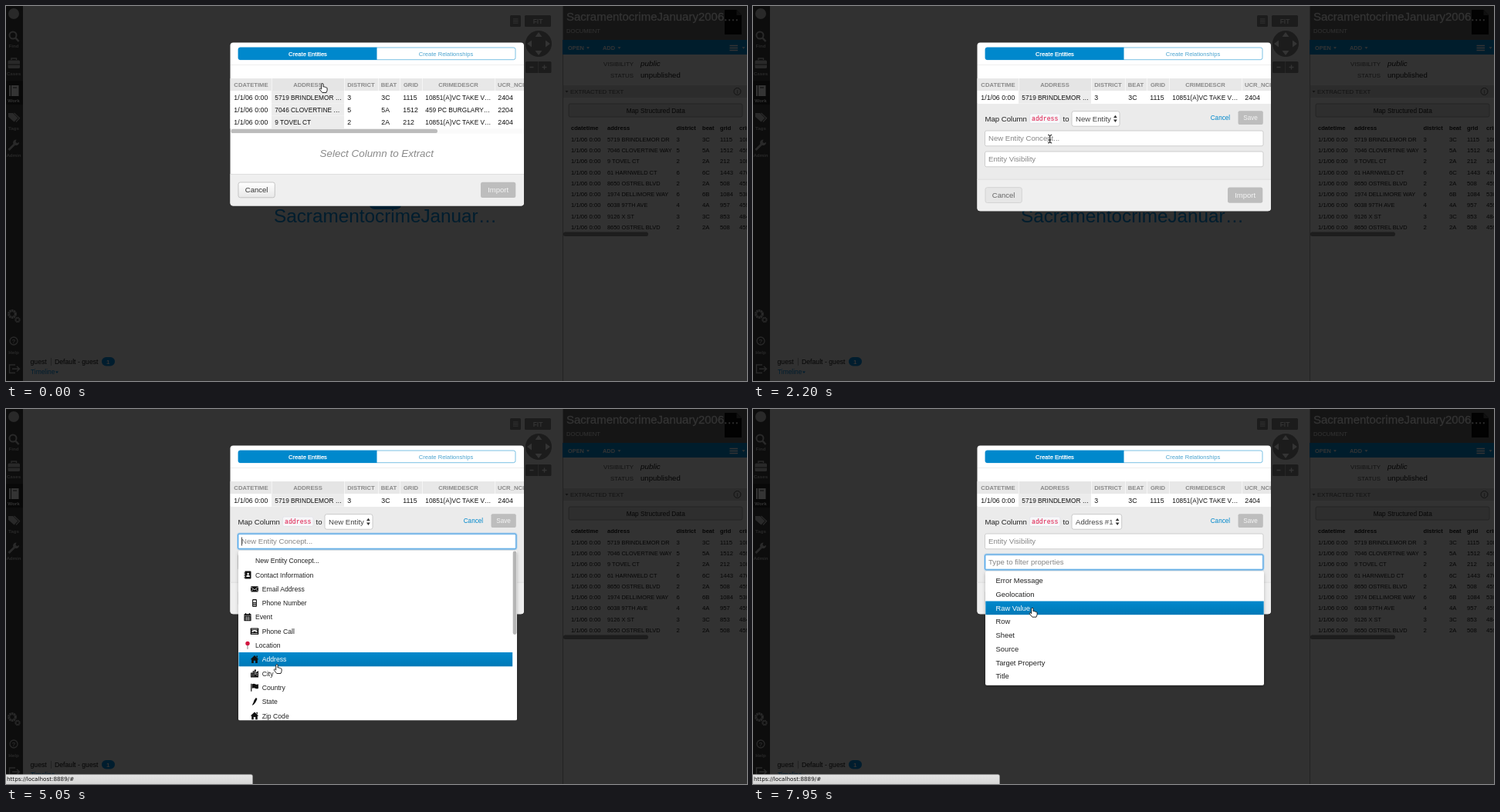
An HTML page for the animation above (8 s loop, 960 by 487 pixels).

```html
<!DOCTYPE html>
<html lang="en">
<head>
<meta charset="utf-8">
<title>Map Structured Data</title>
<style>
html, body { margin: 0; width: 100%; height: 100%; overflow: hidden; background: #313131; }
svg { display: block; width: 100%; height: 100%; font-family: "Liberation Sans", Arial, sans-serif; }
text { white-space: pre; }
</style>
</head>
<body>
<svg id="stage" viewBox="0 0 960 487" xmlns="http://www.w3.org/2000/svg"></svg>
<script>
const LOOP = 8000;
const BLUE = '#0088cc', NAVY = '#001d2e', PALE = '#343434';
const $ = id => document.getElementById(id);

// Markup helpers
const text = (x, y, size, fill, str, extra = '') =>
  `<text x="${x}" y="${y}" font-size="${size}" fill="${fill}" ${extra}>${str}</text>`;
const rect = (x, y, w, h, fill, extra = '') =>
  `<rect x="${x}" y="${y}" width="${w}" height="${h}" fill="${fill}" ${extra}/>`;
const path = (d, fill, extra = '') => `<path d="${d}" fill="${fill}" ${extra}/>`;
const group = (id, body, extra = '') => `<g id="${id}" ${extra}>${body}</g>`;
const at = (x, y, body) => `<g transform="translate(${x} ${y})">${body}</g>`;
const line = (d, stroke, w = 1) => path(d, 'none', `stroke="${stroke}" stroke-width="${w}"`);
const caret = (x, y, fill) => path(`M${x - 2} ${y}h4l-2 2.5z`, fill);
const MID = 'text-anchor="middle"', END = 'text-anchor="end"';
const BOLD = 'font-weight="bold"', ITALIC = 'font-style="italic"';

const ROWS = [
  ['5719 BRINDLEMOR DR', 3, '3C', 1115, '108'],
  ['7046 CLOVERTINE WAY', 5, '5A', 1512, '459'],
  ['9 TOVEL CT', 2, '2A', 212, '108'],
  ['61 HARNWELD CT', 6, '6C', 1443, '476'],
  ['8650 OSTREL BLVD', 2, '2A', 508, '459'],
  ['1974 DELLIMORE WAY', 6, '6B', 1084, '530'],
  ['6038 97TH AVE', 4, '4A', 957, '459'],
  ['9126 X ST', 3, '3C', 853, '484'],
  ['8650 OSTREL BLVD', 2, '2A', 508, '459']
];

const ICONS = {
  book: path('M-3.5-5h7a1 1 0 0 1 1 1v8a1 1 0 0 1-1 1h-7zM-4.6-3h1v1.2h-1zM-4.6 0h1v1.2h-1zM-4.6 3h1v1.2h-1z', '#111') +
    '<circle cx=".6" cy="-1.4" r="1.3" fill="#fff"/>' + path('M-1.8 2.6q0-2.4 2.4-2.4t2.4 2.4z', '#fff'),
  mail: rect(-5, -3.5, 10, 7.4, '#111', 'rx=".8"') + line('M-5-2.8L0 1.2 5-2.8M-5 3.6L-1.6.3M5 3.6L1.6.3', '#fff', .7),
  phone: rect(-2.9, -5, 5.8, 10, '#111', 'rx="1"') + rect(-1.8, -3.6, 3.6, 2.8, '#fff') +
    line('M-1.8.7h3.6M-1.8 2.2h3.6M-1.8 3.7h3.6', '#fff', .7),
  calendar: rect(-4.6, -4, 9.2, 9, '#111', 'rx=".6"') + rect(-3.2, -5.2, 1.4, 2, '#111') + rect(1.8, -5.2, 1.4, 2, '#111') +
    line('M-4.6-1.6h9.2M-3.6 1h7.2M-3.6 3h7.2M-1.2-.8v5M1.2-.8v5', '#fff', .5),
  call: rect(-5.3, -4.2, 10.6, 8.6, '#111', 'rx=".8"') + line('M-4-2.6h8M-4 3h8', '#fff', .7) +
    path('M-3.6.8q0-2.3 3.6-2.3t3.6 2.3l-2 .4-.4-1h-2.4l-.4 1z', '#fff'),
  pin: '<circle cx="0" cy="-2.4" r="2.7" fill="#d3163f"/>' + line('M0 0v5', '#777', .9),
  house: path('M0-5L5.3.2H3.8V4.8H1.2V1.6h-2.4v3.2h-2.6V.2h-1.5zM2.4-4.6h1.5v2.6l-1.5-1.4z', '#111'),
  city: path('M-5 5V-1h2.6v-2.2H-.2V-5H2v3.4L5-3.4V5z', '#111') +
    line('M-4 .8h1M-4 2.8h1M-1.6-1.6h1M-1.6.8h1M-1.6 2.8h1M2.6 0h1.4M2.6 2h1.4M1-3.4v5', '#fff', .8),
  flag: path('M-4.8-5h1.2v10h-1.2zM-3.2-4.5q2.4-1 4.2 0t4 0v5.4q-2.2 1-4 0t-4.2 0z', '#111'),
  state: path('M1.8-5l1.6 1-.7 2.2Q1.4 1.6-1 3.6L-3 5q.2-2 1.4-3.6L-.4-2z', '#111')
};

const CONCEPTS = [
  ['New Entity Concept...', 0], ['Contact Information', 0, 'book'], ['Email Address', 1, 'mail'],
  ['Phone Number', 1, 'phone'], ['Event', 0, 'calendar'], ['Phone Call', 1, 'call'],
  ['Location', 0, 'pin'], ['Address', 1, 'house'], ['City', 1, 'city'],
  ['Country', 1, 'flag'], ['State', 1, 'state'], ['Zip Code', 1, 'house']
];
const PROPS = ['Error Message', 'Geolocation', 'Raw Value', 'Row', 'Sheet', 'Source', 'Target Property', 'Title'];

// Menus: top of the first row and row height
const MENU = {
  concept: { top: 187.9, step: 18.3, count: CONCEPTS.length },
  prop: { top: 214.2, step: 17.67, count: PROPS.length }
};

function sidebar() {
  const ink = '#292929', base = '#0d0d0d';
  const label = (y, s, c = ink) => text(10, y, 6.2, c, s, `${MID} ${BOLD}`);
  return rect(0, 0, 22, 487, base) + rect(0, 97, 22, 31, '#080808') +
    `<circle cx="10" cy="10" r="7" fill="${ink}"/>` +
    `<circle cx="9" cy="38" r="4.5" fill="none" stroke="${ink}" stroke-width="2"/>` + line('M12 41l4.5 5', ink, 2.6) + label(54, 'Find') +
    rect(2.5, 70.5, 15.5, 10.5, ink, 'rx="1.5"') + line('M7 70v-2h6.5v2', ink, 1.5) + line('M2.5 76h15.5', base) + label(89.5, 'Cases') +
    path('M4 103h12.5v14H4z', PALE) + line('M6.5 103v14M9 106h5', base) + label(125, 'Work', PALE) +
    path('M3 139h6l6.5 6.5-5 5L3 144z', ink) + line('M10.5 139l7 6.5-4.5 5', ink, 1.3) + label(160.5, 'Tags') +
    line('M3.5 187l8-8', ink, 3) + path('M17 177l-3 1-1.5-1.5 1-3q-4 0-4.5 4 1 4 5 3.5 3-1 3-4z', ink) + label(195.5, 'Admin') +
    `<circle cx="8" cy="400" r="4.3" fill="none" stroke="${ink}" stroke-width="3.2" stroke-dasharray="2.2 .5"/>` +
    `<circle cx="15" cy="407.5" r="2.6" fill="none" stroke="${ink}" stroke-width="2.2" stroke-dasharray="1.6 .4"/>` +
    `<circle cx="10" cy="435" r="5" fill="none" stroke="${ink}" stroke-width="1.3"/>` +
    text(10, 438, 8, ink, '?', `${MID} ${BOLD}`) + label(451.5, 'Help') +
    line('M12 466H4.5v10.5H12M8 471.2h9M14 468l3.5 3.2-3.5 3.3', ink, 1.5);
}

function graph() {
  const dark = '#1c1c1c';
  return rect(470, 240, 43, 24, NAVY, 'rx="8"') +
    text(491.5, 281, 24.3, NAVY, 'SacramentocrimeJanuar…', MID) +
    rect(653, 12, 14, 15, dark, 'rx="1.5"') + line('M657 17h6.5M657 19.5h6.5M657 22h6.5', PALE) +
    rect(672, 12, 34, 15, dark, 'rx="1.5"') + text(689, 23, 8.5, PALE, 'FIT', `${MID} ${BOLD}`) +
    `<circle cx="690" cy="49" r="17" fill="${dark}"/>` +
    path('M690 34l4.5 6h-9zM690 64l4.5-6h-9zM675 49l6-4.5v9zM705 49l-6-4.5v9z', PALE) +
    rect(673, 72, 33.5, 15, dark, 'rx="1.5"') + line('M689.7 72v15', '#292929') +
    line('M678.5 79.5h5M694.5 79.5h6M697.5 76.5v6', PALE, 1.4) +
    text(31.5, 464.6, 8.7, '#050505', 'guest') + line('M58.5 457v10', '#222') +
    text(63, 464.6, 8.7, '#050505', 'Default - guest') +
    rect(124, 456, 17, 11.5, NAVY, 'rx="5.7"') + text(132.3, 464.6, 8, PALE, '1', `${MID} ${BOLD}`) +
    text(32, 478, 8.4, NAVY, 'Timeline') + caret(66, 474.5, NAVY);
}

function detail() {
  const ink = '#060606', soft = '#131313';
  let s = rect(721, 0, 239, 487, '#323232') + rect(721, 0, 239, 44, '#151515') + line('M721.5 0v487', '#232323') +
    path('M931 5h15.5l6.5 7v25h-22z', '#020202') + path('M946.5 5v7h6.5z', '#101010') +
    text(726, 18.7, 15, PALE, 'SacramentocrimeJanuary2006.…', `stroke="${PALE}" stroke-width=".3"`) +
    text(726, 35.4, 7.6, PALE, 'DOCUMENT') +
    rect(721, 44, 239, 19, '#001d2c') +
    text(728, 57, 7.4, PALE, 'OPEN', BOLD) + caret(754, 53.3, PALE) +
    text(773, 57, 7.4, PALE, 'ADD', BOLD) + caret(794.5, 53.3, PALE) +
    line('M937.5 51.5h10.5M937.5 54.5h10.5M937.5 57.5h10.5', PALE, 1.3) + caret(955.5, 53.3, PALE) +
    text(813, 77.7, 7.9, soft, 'VISIBILITY', END) + text(822, 78, 9.9, ink, 'public', ITALIC) +
    text(813, 92.6, 7.9, soft, 'STATUS', END) + text(822, 93, 9.6, ink, 'unpublished') +
    rect(722, 103, 238, 16, '#2c2c2c') + caret(726.5, 110, soft) + text(731, 114, 7.8, soft, 'EXTRACTED TEXT') +
    `<circle cx="947.5" cy="111" r="4.5" fill="none" stroke="${soft}"/>` + text(947.5, 113.8, 7.5, soft, 'i', MID) +
    rect(729, 127, 225, 17, '#2e2e2e', 'rx="2" stroke="#252525"') + text(841.7, 138.6, 8.25, ink, 'Map Structured Data', MID);
  const cols = [732, 779, 868.5, 902, 925, 950];
  ['cdatetime', 'address', 'district', 'beat', 'grid', 'crimedescr'].forEach((h, i) => s += text(cols[i], 161.4, 7.6, ink, h, BOLD));
  ROWS.forEach((r, n) => ['1/1/06 0:00', ...r].forEach((v, i) =>
    s += text(cols[i], (175.8 + n * 14.25).toFixed(1), i === 1 ? 7.4 : 7.7, ink, v)));
  return s + rect(722, 293.5, 110, 5.5, '#1d1d1d', 'rx="2.5"');
}

function table() {
  const edges = [291, 344, 438, 482, 510, 539, 633, 671];
  const heads = ['CDATETIME', 'ADDRESS', 'DISTRICT', 'BEAT', 'GRID', 'CRIMEDESCR'];
  const cells = [
    ['1/1/06 0:00', '5719 BRINDLEMOR …', 3, '3C', 1115, '10851(A)VC TAKE V…', 2404],
    ['1/1/06 0:00', '7046 CLOVERTINE …', 5, '5A', 1512, '459 PC BURGLARY…', 2204],
    ['1/1/06 0:00', '9 TOVEL CT', 2, '2A', 212, '10851(A)VC TAKE V…', 2404]
  ];
  let s = rect(290, 94, 382, 16, '#e8e8e8') + rect(344, 94, 94, 16, '#e5e5e5');
  heads.forEach((h, i) => s += text((edges[i] + edges[i + 1]) / 2, 105.3, 7.7, '#8a8a8a', h, `${MID} ${BOLD}`));
  s += text(637, 105.3, 7.7, '#8a8a8a', 'UCR_NCIC', BOLD);
  edges.slice(1, 7).forEach(x => s += line(`M${x + .5} 94v16`, '#f8f8f8', .8));
  const row = n => rect(290, 110 + n * 16.3, 382, 16.7, '#fff') + rect(344, 110 + n * 16.3, 94, 16.7, '#ececec') +
    cells[n].map((v, i) => text(edges[i] + 4.3, (121.7 + n * 16.3).toFixed(1), i === 1 || i === 5 ? 8.3 : 8.8, '#111', v)).join('');
  return s + row(0) + group('moreRows', row(1) + row(2) + rect(291, 159.2, 380, 6.5, '#fafafa') +
    rect(291.5, 159.7, 267.5, 5.3, '#bcbcbc', 'rx="2.6"'));
}

const field = y => rect(300.5, y, 360.5, 19.8, '#fff', 'rx="2" stroke="#c9c9c9" stroke-width=".9"');
const glow = (id, y) => group(id, rect(300.5, y, 360.5, 19.8, 'none', 'rx="2" stroke="#52a8ec" stroke-opacity=".35" stroke-width="3"') +
  rect(300.5, y, 360.5, 19.8, 'none', 'rx="2" stroke="#52a8ec"'));
const select = (id, w, label) => group(id, rect(413, 136.7, w, 19.5, '#fff', 'rx="2.5" stroke="#c6c6c6" stroke-width=".9"') +
  text(418, 149.8, 9.6, '#444', label) + path(`M${w + 405} 145.3h4.8l-2.4-3.5zM${w + 405} 147.5h4.8l-2.4 3.5z`, '#333'));

function modal() {
  return rect(290.5, 47.5, 380.5, 212, '#fff', 'id="box" rx="4"') +
    rect(301, 54, 359, 15.7, '#fff', `rx="2.5" stroke="${BLUE}" stroke-opacity=".65" stroke-width=".8"`) +
    path('M303.5 53.7h177v16.3h-177a2.7 2.7 0 0 1-2.7-2.7v-10.9a2.7 2.7 0 0 1 2.7-2.7z', BLUE) +
    text(391, 64.6, 7.6, '#fff', 'Create Entities', `${MID} stroke="#fff" stroke-width=".25"`) +
    text(570, 64.6, 7.6, '#4ba3cf', 'Create Relationships', MID) +
    line('M291 76.5h380', '#ebebeb', .8) +
    `<g clip-path="url(#modalClip)">${table()}</g>` +
    group('hint', text(480.3, 196.4, 13.4, '#8a8a8a', 'Select Column to Extract', `${MID} ${ITALIC}`)) +
    group('form', rect(290.5, 127, 380.5, 98.5, '#ebebeb') +
      text(300.5, 149.6, 9.6, '#222', 'Map Column') +
      rect(358.5, 140, 39.5, 12.5, '#f7f7f9', 'rx="2" stroke="#e1e1e8" stroke-width=".8"') +
      text(361, 149.2, 8.2, '#dd1144', 'address', 'font-family="Liberation Mono, monospace"') +
      text(401.5, 149.6, 9.6, '#222', 'to') +
      select('pickNew', 62, 'New Entity') + select('pickAddress', 64.7, 'Address #1') +
      text(592.7, 148.2, 8.2, BLUE, 'Cancel') +
      rect(628.5, 136.3, 32.3, 17.7, '#bdbdbd', 'rx="2"') + text(644.6, 148.2, 8.2, '#f4f4f4', 'Save', MID) +
      field(162) + field(189) +
      text(305, 175.2, 9.6, '#868686', '', 'id="hintA"') + text(305, 202.2, 9.6, '#868686', '', 'id="hintB"') +
      glow('glowA', 162) + glow('glowB', 189) +
      rect(305, 166.5, .8, 11, '#222', 'id="caretA"') + rect(305, 193.5, .8, 11, '#222', 'id="caretB"')) +
    group('footer', path('M290.5 218.5h380.5v37a4 4 0 0 1-4 4H294.5a4 4 0 0 1-4-4z', '#efefef') + line('M290.5 218.5h380.5', '#dcdcdc', .9) +
      rect(301, 229, 47.3, 19.8, 'url(#btn)', 'id="cancelBtn" rx="2.5" stroke-width=".9"') +
      text(324.6, 242.2, 9.5, '#333', 'Cancel', `id="cancelText" ${MID}`) +
      rect(615, 228.7, 45.3, 20.3, '#bdbdbd', 'rx="2.5"') + text(637.6, 242.2, 9.5, '#f4f4f4', 'Import', MID));
}

function menus() {
  const row = (m, i) => m.top + (i + .5) * m.step;
  const c = MENU.concept, p = MENU.prop;
  let a = rect(301, 184, 361, 220.5, '#fff', 'rx="2" filter="url(#shade)"') +
    rect(301.5, 0, 354.7, c.step, 'url(#hot)', 'id="conceptBar"') + rect(656.7, 184.5, 4.8, 108.5, '#b5b5b5', 'rx="2.4"');
  CONCEPTS.forEach(([name, depth, icon], i) => {
    const y = row(c, i);
    if (icon) a += at(313 + depth * 9, y.toFixed(1), ICONS[icon]);
    a += text(323 + depth * 8.7, (y + 3.1).toFixed(1), 8.65, '#222', name, `id="concept${i}"`);
  });
  let b = rect(301, 210.8, 361, 148, '#fff', 'rx="2" filter="url(#shade)"') + rect(301.3, 0, 360.4, p.step, 'url(#hot)', 'id="propBar"');
  PROPS.forEach((name, i) => b += text(314.5, (row(p, i) + 3.4).toFixed(1), 9.35, '#222', name, `id="prop${i}"`));
  return group('conceptMenu', a, 'clip-path="url(#menuClip)"') + group('propMenu', b);
}

function overlay() {
  const beam = 'M-2.5-5Q0-5 0-3.6 0-5 2.5-5M0-4V4.5M-2.5 5.5Q0 5.5 0 4 0 5.5 2.5 5.5M-1.5 1.5h3';
  return group('status', rect(-3, 474.7, 322.5, 15, 'url(#bar)', 'rx="2" stroke="#999" stroke-width=".7"') +
      text(1, 483.4, 7.2, '#111', 'https://localhost:8889/#', 'font-family="DejaVu Sans, sans-serif"')) +
    group('cursor',
      path('M-1.3 6.5V.8a1.2 1.2 0 0 1 2.4 0V4q1.4-.6 2 .4 1.2-.5 1.6.5 1.4-.2 1.4 1.2V8.5L5 11.5H-.2L-3.6 7.4q-.6-1.1.4-1.5.8-.2 1.9 1.2z',
        '#fff', 'id="hand" stroke="#111" stroke-width=".9" stroke-linejoin="round"') +
      path('M0 0V9.6L2.2 7.6 3.7 11.2 5.4 10.5 3.9 7H7z', '#000', 'id="arrow" stroke="#fff" stroke-width=".8"') +
      group('beam', line(beam, '#fff', 2) + line(beam, '#000')));
}

const fade = (id, from, to) => `<linearGradient id="${id}" x2="0" y2="1"><stop stop-color="${from}"/><stop offset="1" stop-color="${to}"/></linearGradient>`;
$('stage').innerHTML = `<defs>${fade('btn', '#fff', '#e8e8e8')}${fade('hot', BLUE, '#0079b7')}${fade('bar', '#e6e6e6', '#d2d2d2')}
  <clipPath id="modalClip"><rect x="290.5" y="48" width="380.5" height="220"/></clipPath>
  <clipPath id="menuClip"><rect x="290" y="180" width="380" height="224.5"/></clipPath>
  <filter id="shade" x="-5%" y="-8%" width="110%" height="118%"><feDropShadow dx="0" dy="2" stdDeviation="2" flood-opacity=".25"/></filter></defs>` +
  rect(0, 0, 960, 487, '#313131') + sidebar() + graph() + detail() + modal() + menus() + overlay();

// Moments of interaction
const T = { column: 500, focusA: 2600, menuA: 2650, pick: 5500, focusB: 7170, menuB: 7300 };
const STATUS = [[4500, 6400], [7700, LOOP]];
const TRACK = [[0, 410, 101], [1300, 410, 101], [2300, 384, 174.5], [4300, 384, 174.5], [4850, 351, 332],
  [5550, 351, 332], [5900, 354, 325], [6400, 354, 325], [7050, 376.7, 202], [7450, 376.7, 202], [7880, 362, 258.7], [LOOP, 362, 258.7]];

const show = (id, on) => $(id).style.display = on ? '' : 'none';
const within = (v, a, b) => v >= a && v < b;

function pointer(t) {
  const i = TRACK.findIndex(k => k[0] > t);
  const [t0, x0, y0] = TRACK[i - 1], [t1, x1, y1] = TRACK[i];
  const u = (t - t0) / (t1 - t0), e = u * u * (3 - 2 * u);
  return [x0 + (x1 - x0) * e, y0 + (y1 - y0) * e];
}

function highlight(name, y) {
  const { top, step, count } = MENU[name];
  const hot = Math.max(0, Math.min(count - 1, Math.floor((y - top) / step)));
  $(name + 'Bar').setAttribute('y', top + hot * step);
  for (let i = 0; i < count; i++) $(name + i).setAttribute('fill', i === hot ? '#fff' : '#222');
}

function focus(name, t, since, until) {
  const on = within(t, since, until);
  show('glow' + name, on);
  show('caret' + name, on && (t - since) % 1000 < 500);
  $('glow' + name).style.opacity = Math.min(1, (t - since) / 200);
}

function draw(t) {
  const [x, y] = pointer(t);
  const mapping = t >= T.column, picked = t >= T.pick;
  const menuA = within(t, T.menuA, T.pick), menuB = t >= T.menuB;

  show('moreRows', !mapping);
  show('hint', !mapping);
  show('form', mapping);
  $('box').setAttribute('height', mapping ? 218.7 : 212);
  $('footer').setAttribute('transform', `translate(0 ${mapping ? 6.7 : 0})`);
  $('cancelBtn').setAttribute('fill', mapping ? '#e6e6e6' : 'url(#btn)');
  $('cancelBtn').setAttribute('stroke', mapping ? '#d2d2d2' : '#bfbfbf');
  $('cancelText').setAttribute('fill', mapping ? '#666' : '#333');
  show('pickNew', !picked);
  show('pickAddress', picked);
  $('hintA').textContent = picked ? 'Entity Visibility' : 'New Entity Concept...';
  $('hintB').textContent = picked ? 'Type to filter properties' : 'Entity Visibility';

  focus('A', t, T.focusA, T.pick);
  focus('B', t, T.focusB, LOOP);
  show('conceptMenu', menuA);
  show('propMenu', menuB);
  if (menuA) highlight('concept', y);
  if (menuB) highlight('prop', y);
  show('status', STATUS.some(([a, b]) => within(t, a, b)));

  const hand = !mapping || menuA && y > 184 || menuB && y > 211;
  const beam = !hand && (within(y, 162, 182) || within(y, 189, 209));
  show('hand', hand);
  show('beam', beam);
  show('arrow', !hand && !beam);
  $('cursor').setAttribute('transform', `translate(${x.toFixed(2)} ${y.toFixed(2)})`);
}

const start = performance.now();
function tick() {
  draw((performance.now() - start) % LOOP);
  requestAnimationFrame(tick);
}
tick();
</script>
</body>
</html>
```
